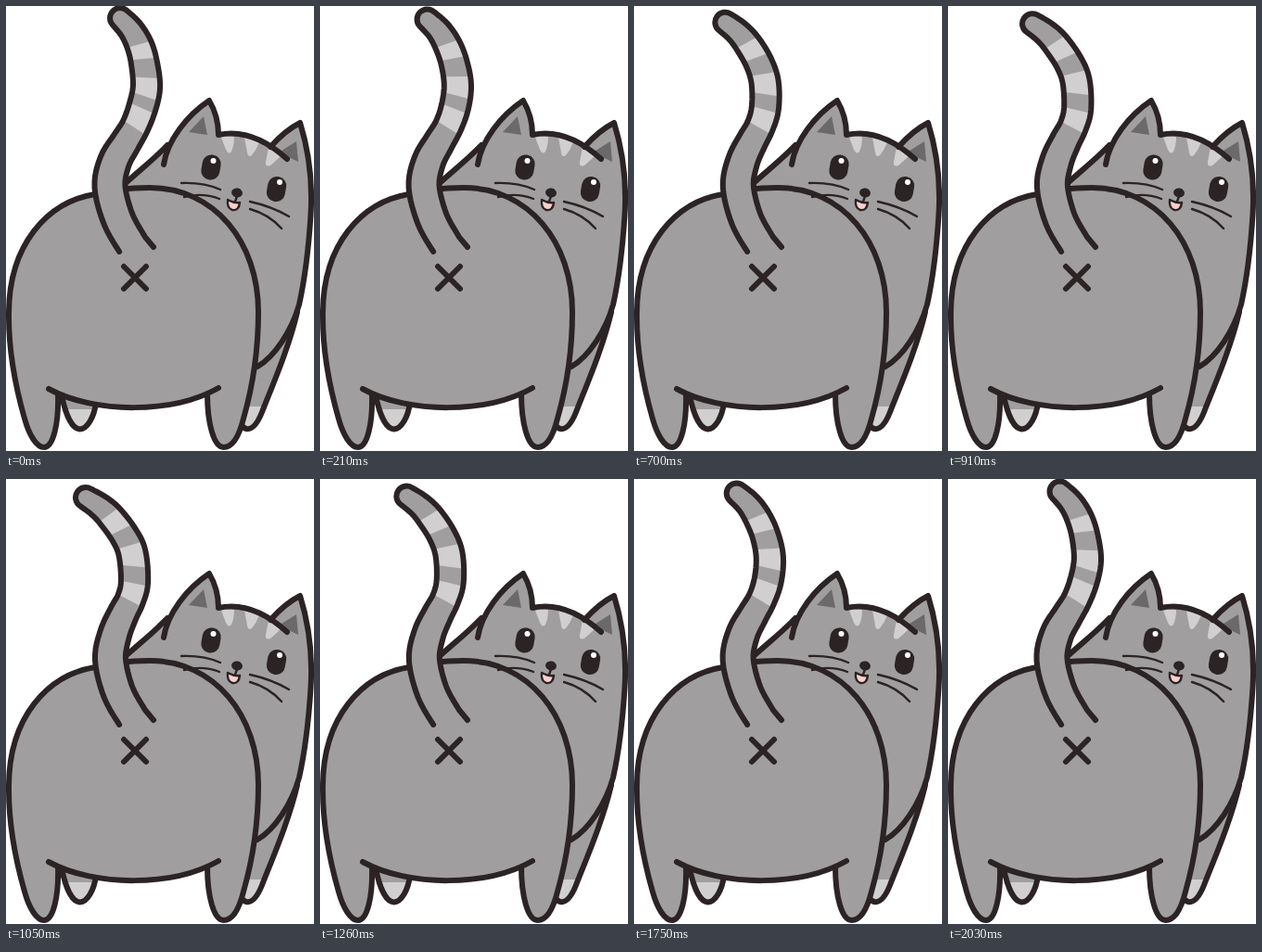
These frames come from a looping animation (332 by 480 pixels, 2.1 s). An HTML page:

```html
<!DOCTYPE html>
<html lang="en">
<head>
<meta charset="utf-8">
<title>Cat wagging its tail</title>
<style>
html, body { margin: 0; width: 100%; height: 100%; overflow: hidden; background: #fff; }
svg { display: block; width: 332px; height: 480px; }
.ink { stroke: #2b2324; stroke-width: 6; stroke-linecap: round; stroke-linejoin: round; }
.thin { stroke-width: 2.4; }
.fur { fill: #a09e9f; }
.pale { fill: #d1cfd0; }
.dark { fill: #6c696a; }
.black { fill: #2b2324; }
.line { fill: none; }
</style>
</head>
<body>
<svg viewBox="0 0 332 480">
  <defs>
    <path id="legs" d="M60,420C64,440 71,456 79.500,456.500C88,456 95,443 97,428M266,385L314,330C305,368 289,405 276,438C270,453 264,457 259,456C255,455 253,451 252,447"/>
    <clipPath id="toes"><path d="M50,435H110V470H50ZM240,432H300V470H240Z"/></clipPath>
  </defs>

  <!-- far legs -->
  <use href="#legs" class="fur"/>
  <use href="#legs" class="pale" clip-path="url(#toes)"/>
  <use href="#legs" class="ink line"/>

  <!-- head and chest -->
  <path class="fur" d="M130,190C143,178 160,165 174,150C182,135 200,115 219,102C225,112 229,125 229,139C250,136 268,141 285,151C293,143 305,132 317,126C326,155 331,185 328.500,225C326,265 322,295 316,322C308,350 290,378 271,389L150,260Z"/>
  <path class="dark" d="M197,136L213,119L217,139ZM294,158L313,146L315,168Z"/>
  <path class="pale" d="M231,139L246,141Q246,150 243,157Q240,161 237,155ZM257,142L273,147Q270,155 265,161Q261,164 260,158ZM283,152L297,161Q291,167 285,172Q279,174 280,168Z"/>
  <path class="ink line" d="M130,190C143,178 160,165 174,150M170,171C174,145 195,118 219,102C225,112 229,125 229,139C256,133 282,146 303,165M285,152C293,143 305,132 317,126C326,155 331,185 328.500,225C326,265 322,295 316,322C308,350 290,378 271,389"/>

  <!-- body -->
  <path class="fur" d="M96,203C46,211 2,256 3,335C3,375 10,410 20,445C25,463 33,476 41,476C51,476 57,450 56,418C100,437 175,437 217,418C217,450 224,476 234.500,476C244,476 251,465 256,445C266,410 272,375 272,330C272,255 225,196 155,196C130,196 110,199 96,203Z"/>
  <path class="ink line" d="M56,418C57,450 51,476 41,476C33,476 25,463 20,445C10,410 3,375 3,335C2,256 46,211 96,203C110,199 130,196 155,196C225,196 272,255 272,330C272,375 266,410 256,445C251,465 244,476 234.500,476C224,476 217,450 217,418M46,413C95,440 180,440 229,412M127,281L151,305M151,281L127,305"/>

  <!-- face -->
  <g id="open">
    <rect class="black" x="211" y="160.500" width="20" height="27" rx="9.500" transform="rotate(10 221 174)"/>
    <rect class="black" x="281.500" y="184" width="20" height="27" rx="9.500" transform="rotate(10 291.500 197.500)"/>
    <circle cx="223.500" cy="167" r="3" fill="#fff"/>
    <circle cx="295" cy="190" r="3" fill="#fff"/>
  </g>
  <path id="shut" class="ink thin line" d="M213,170.500L229,175M283,193.500L299,198.500"/>
  <path class="ink thin" fill="#fbd0cb" d="M239,209Q246,213 252,212Q251,221 244,220Q238,218 239,209Z"/>
  <ellipse class="black" cx="249" cy="201.500" rx="6" ry="5" transform="rotate(12 249 201.500)"/>
  <path class="ink thin line" d="M249,205L247,211M189,191Q213,190 231,198M192,206Q212,201 230,208M263,211Q286,216 305,227M263,219Q284,225 297,240"/>

  <!-- tail -->
  <path id="tail" class="fur"/>
  <path id="bands" class="pale"/>
  <path id="edge" class="ink line"/>
</svg>
<script>
const $ = id => document.getElementById(id);
const STEP = 70, STEPS = 30;

// Tail spine from base to tip at both ends of the swing, and its half width
const right = [[136,257],[121,230],[112,195],[117,168],[129,147],[139,130],[147,109],[151.5,87],[149,62],[144,43],[135,26],[123,13]];
const left = [[136,257],[121,230],[112.5,195],[117,168],[126,146],[134,130],[138.5,111],[136,80],[127,60],[112,40],[100,29],[86,20]];
const half = [16,16.3,16.5,16,15,14.3,14.6,14.6,14,13.4,12.2,11];
const last = half.length - 1;

const lerp = (a, b, t) => a + (b - a) * t;

// Catmull-Rom value of a list at position u
function spline(list, u) {
  const i = Math.min(Math.floor(u), last - 1), t = u - i;
  const [a, b, c, d] = [-1, 0, 1, 2].map(k => list[Math.max(0, Math.min(last, i + k))]);
  return b + t / 2 * (c - a + t * (2 * a - 5 * b + 4 * c - d + t * (3 * (b - c) + d - a)));
}

const join = points => points.map(p => p.map(v => v.toFixed(2)).join()).join("L");

function drawTail(swing) {
  const xs = right.map((p, i) => lerp(p[0], left[i][0], swing));
  const ys = right.map((p, i) => lerp(p[1], left[i][1], swing));

  function side(u, sign) {
    const lo = Math.max(0, u - 0.05), hi = Math.min(last, u + 0.05);
    const dx = spline(xs, hi) - spline(xs, lo), dy = spline(ys, hi) - spline(ys, lo);
    const w = sign * spline(half, u) / Math.hypot(dx, dy);
    return [spline(xs, u) - dy * w, spline(ys, u) + dx * w];
  }
  const run = (from, to, sign) =>
    Array.from({ length: 67 }, (_, i) => side(lerp(from, to, i / 66), sign));

  const r = half[last];
  const outline = "M" + join(run(0, last, -1)) + `A${r},${r} 0 0 1 ` +
    join(run(last, 0, 1)) + "L159,260";
  $("tail").setAttribute("d", outline + "Z");
  $("edge").setAttribute("d", outline);
  // Bands sit slightly lower on the right edge
  const skew = 0.08;
  $("bands").setAttribute("d", [[4.95, 5.95], [6.55, 7.4], [8.25, 9.1]]
    .map(([a, b]) => "M" + join([...run(a + skew, b + skew, -1), ...run(b - skew, a - skew, 1)]) + "Z").join(""));
}

const start = performance.now();

function frame() {
  const n = Math.floor((performance.now() - start) / STEP) % STEPS;
  const blink = n >= 21 && n < 24;
  drawTail(1 - Math.abs(1 - n / 15));
  $("open").style.display = blink ? "none" : "";
  $("shut").style.display = blink ? "" : "none";
  requestAnimationFrame(frame);
}
frame();
</script>
</body>
</html>
```
